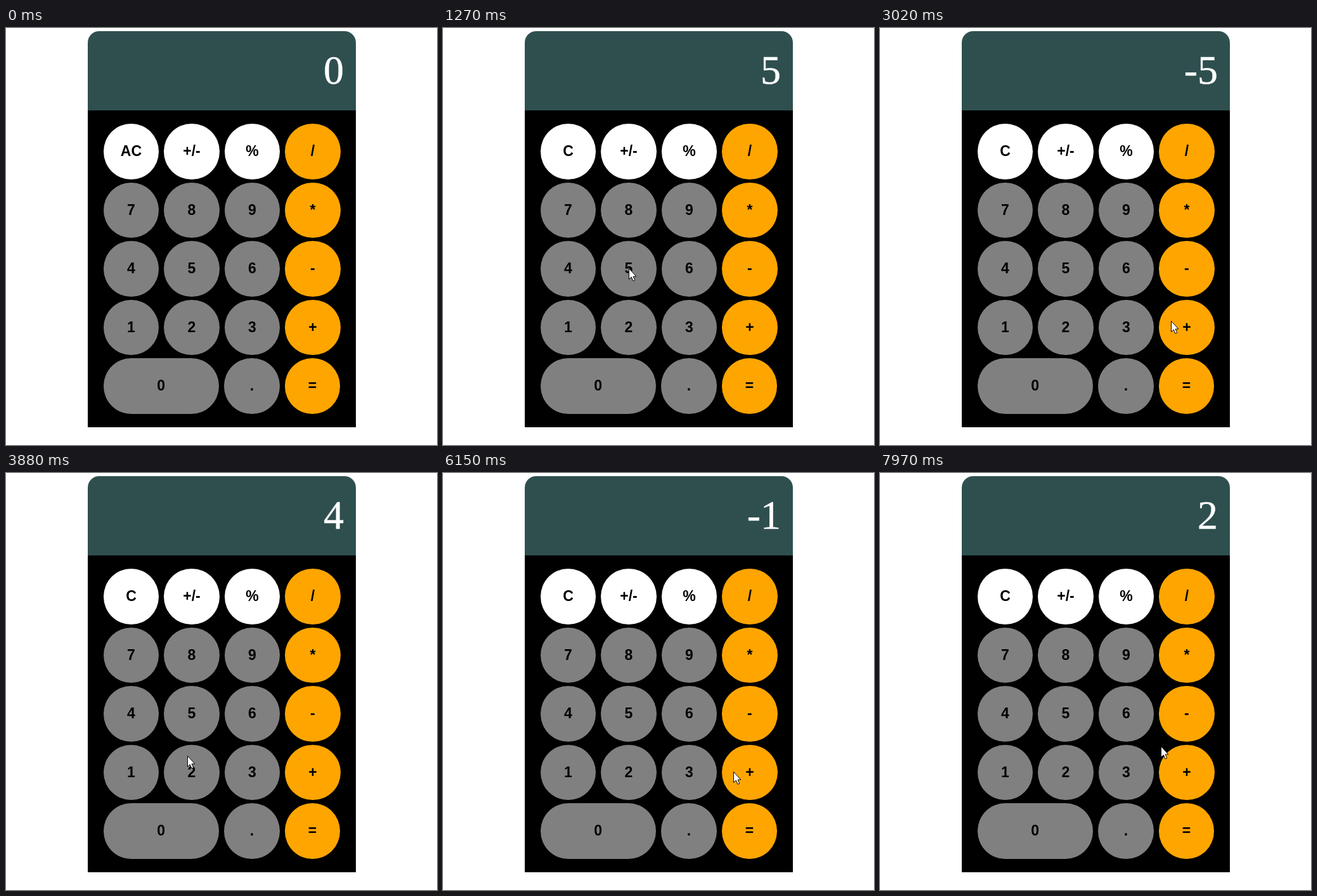
An HTML page that plays this animation: 680x658 px, repeating every 8000 ms.

```html
<!DOCTYPE html>
<html lang="en">
<head>
<meta charset="utf-8">
<title>Calculator</title>
<style>
  html, body { margin: 0; width: 100%; height: 100%; overflow: hidden; background: #fff; }
  svg { display: block; }
  #keys { font: bold 23px "Liberation Sans", Arial, sans-serif; text-anchor: middle; }
  #display {
    font: 64px "Liberation Serif", "Times New Roman", serif;
    text-anchor: end; fill: #fff; stroke: #fff; stroke-width: .5px;
  }
</style>
</head>
<body>
<svg width="680" height="658" viewBox="0 0 680 658">
  <rect x="129" y="130" width="423" height="500"/>
  <path d="M129 130V23a18 18 0 0 1 18-18H534a18 18 0 0 1 18 18V130Z" fill="#2f4f4f"/>
  <text id="display" x="533" y="88">0</text>
  <g id="keys"></g>
  <path id="cursor" d="M.5 .5V17.5L4.3 14L7 20.2L9.7 19L7.1 13H12Z" fill="#fff" stroke="#000" visibility="hidden"/>
</svg>
<script>
const LOOP = 8000;
const START = { time: 100, x: 556, y: 650 };
const PRESS_DELAY = 120;
const BOW = 0.064; // sideways swing of a glide, relative to its length
const SIZE = 87.5;
const find = id => document.getElementById(id);
const [display, keys, cursor] = ['display', 'keys', 'cursor'].map(find);

function add(tag, attrs) {
  const el = document.createElementNS('http://www.w3.org/2000/svg', tag);
  for (const name in attrs) el.setAttribute(name, attrs[name]);
  return keys.appendChild(el);
}

// Key edges are snapped to whole pixels.
function addKey(label, left, row, width, fill) {
  const top = 151.25 + 92.5 * row;
  const x = Math.round(left), y = Math.round(top);
  add('rect', {
    x, y, fill, rx: SIZE / 2,
    width: Math.round(left + width) - x,
    height: Math.round(top + SIZE) - y
  });
  const text = add('text', { x: left + width / 2, y: Math.round(top + 51) });
  text.textContent = label;
  return text;
}

const rows = [['AC', '+/-', '%', '/'], [7, 8, 9, '*'], [4, 5, 6, '-'], [1, 2, 3, '+']];
const labels = rows.flatMap((row, r) => row.map((label, c) =>
  addKey(label, 153.7 + 95.5 * c, r, SIZE, c === 3 ? '#ffa500' : r ? '#808080' : '#fff')));
addKey('0', 153.7, 4, 182, '#808080');
addKey('.', 344.2, 4, SIZE, '#808080');
addKey('=', 439.7, 4, SIZE, '#ffa500');

// Pointer glides: leave, arrive, x, y, reading after the press
const glides = [
  [100, 1030, 293, 379, '5'],
  [1270, 1610, 293, 196, '-5'],
  [1860, 2530, 499, 490, '-5'],
  [2860, 3530, 197, 362, '4'],
  [3720, 4130, 490, 560, '4'],
  [4200, 4240, 490, 561, '-1'],
  [5280, 5670, 483, 479, '-1'],
  [6080, 6290, 388, 467, '3'],
  [6460, 7050, 504, 576, '2'],
  [7260, 8000, 443, 430, '2']
];

const smooth = u => u * u * (3 - 2 * u);

function stateAt(t) {
  let { x, y } = START, reading = '0';
  for (const [leave, arrive, toX, toY, shows] of glides) {
    if (t < leave) break;
    const e = smooth(Math.min(1, (t - leave) / (arrive - leave)));
    const swing = BOW * 4 * e * (1 - e);
    const dx = toX - x, dy = toY - y;
    x += dx * e - dy * swing;
    y += dy * e + dx * swing;
    if (t >= arrive + PRESS_DELAY) reading = shows;
  }
  return { x: Math.round(x), y: Math.round(y), reading };
}

function draw() {
  const t = performance.now() % LOOP;
  const { x, y, reading } = stateAt(t);
  display.textContent = reading;
  labels[0].textContent = reading === '0' ? 'AC' : 'C';
  cursor.setAttribute('visibility', t < START.time ? 'hidden' : 'visible');
  cursor.setAttribute('transform', `translate(${x} ${y})`);
  requestAnimationFrame(draw);
}
draw();
</script>
</body>
</html>
```
